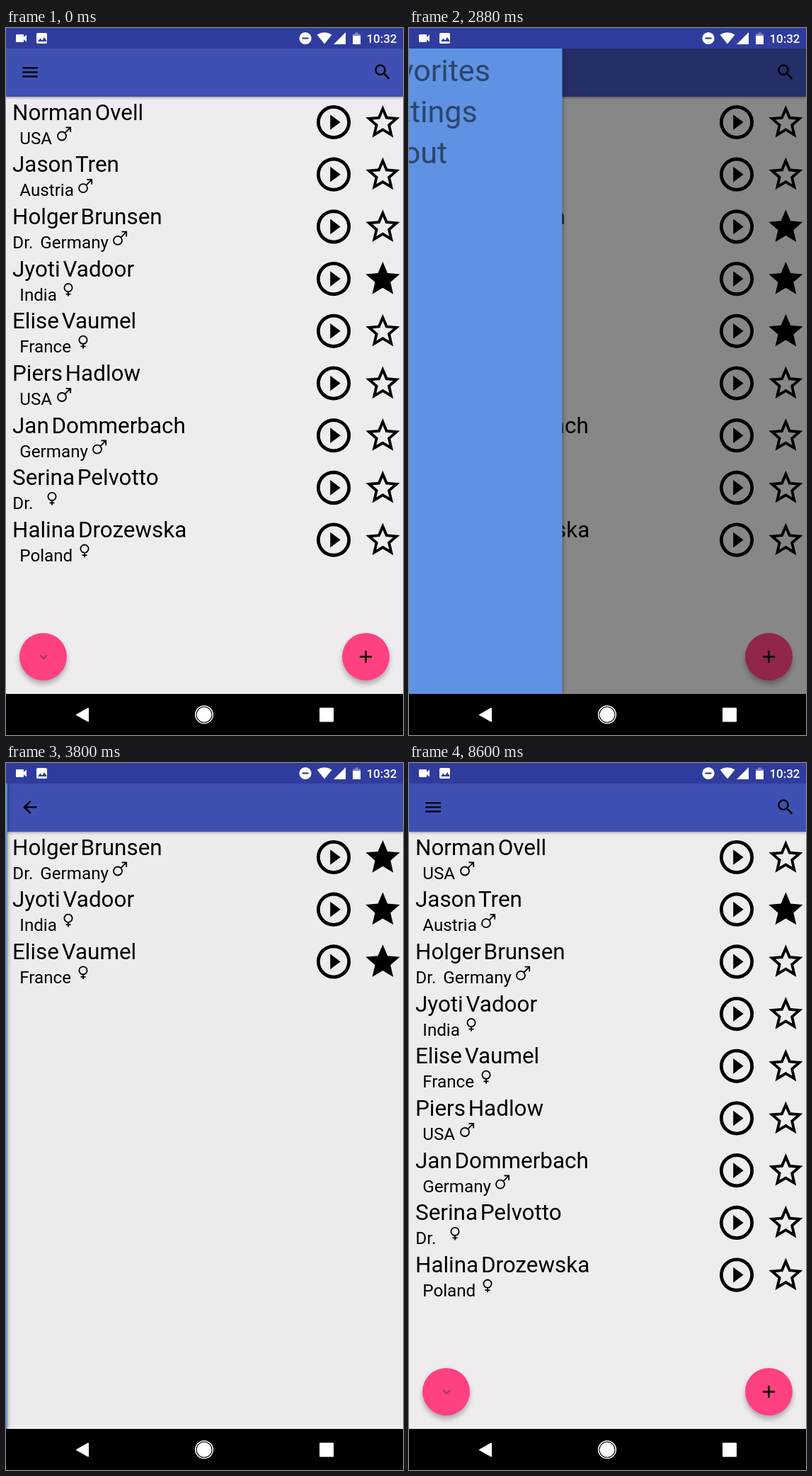
Write an HTML page that moves like this. It is 561 px wide and 998 px high and loops after 8.84 s.

```html
<!DOCTYPE html>
<html lang="en">
<head>
<meta charset="utf-8">
<title>Contacts</title>
<style>
  html, body { margin: 0; width: 100%; height: 100%; overflow: hidden; background: #000; }
  #stage { position: relative; width: 561px; height: 998px; overflow: hidden; color: #000;
    font-family: Roboto, sans-serif; }
  #stage div, #stage svg { position: absolute; }
  svg { display: block; overflow: visible; }
  #status { left: 0; top: 0; background: #303c9d; }
  #nav { left: 0; top: 940px; background: #000; }
  #app { left: 0; top: 29px; width: 561px; height: 911px; overflow: hidden; background: #eeecef; }
  #bar { left: 0; top: 0; width: 561px; height: 67.5px; background: #3f50b4;
    box-shadow: 0 1px 4px rgba(0, 0, 0, .4); }
  .row { left: 0; top: 0; width: 561px; height: 74px; white-space: nowrap; }
  .name { left: 9px; top: 4.5px; font-size: 31.4px; line-height: 36px; word-spacing: -4px; }
  .info { left: 9.3px; top: 45px; display: flex; font-size: 24.2px; line-height: 28px; }
  #stage .info svg { position: static; margin: -4px 0 0 4.5px; }
  .info span { margin-left: 10px; }
  .icon { left: 0; top: 0; }
  .fab { top: 825px; width: 67px; height: 67px; border-radius: 50%; background: #ff4081;
    box-shadow: 0 5px 7px rgba(0, 0, 0, .28); }
  #scrim { inset: 0; background: #000; }
  #drawer { left: 0; top: 0; width: 290px; height: 911px; background: #5f92e3;
    box-shadow: 0 0 6px rgba(0, 0, 0, .45); font-size: 43px; line-height: 58px; color: #2c456c; }
  #drawer div { left: 0; width: 277px; padding-left: 13px; height: 58px; }
  #press { top: 1px; background: rgba(0, 0, 0, .06); }
</style>
</head>
<body>
<div id="stage">
  <div id="app">
    <div id="home"></div>
    <div id="faves"></div>
    <div id="bar"></div>
    <div id="fabs">
      <div class="fab" style="left:19px"><svg width="67" height="67"><path d="M29 31.2l5 5 5-5" fill="none" stroke="#84405a" stroke-width="1.7"/></svg></div>
      <div class="fab" style="left:475px"></div>
    </div>
    <div id="scrim"></div>
    <div id="drawer">
      <div id="press"></div>
      <div style="top:2px">Favorites</div>
      <div style="top:60px">Settings</div>
      <div style="top:118px">About</div>
    </div>
  </div>
  <svg id="status" width="561" height="29" fill="#fff">
    <rect x="14" y="9" width="11" height="11" rx="1"/>
    <path d="M24 13.5l5-4v10l-5-4z"/>
    <rect x="43" y="7" width="15" height="15" rx="2"/>
    <path d="M45 19l3.5-4.5 2.5 3 3-4.5 4 6z" fill="#303c9d"/>
    <circle cx="423" cy="14.5" r="8.6"/>
    <path d="M418.5 13.4h9v2.2h-9z" fill="#303c9d"/>
    <path d="M450 22.5L439.5 9.6q10.5-6.5 21 0z"/>
    <path d="M480 6v17h-17z"/>
    <path d="M490 8.5h3.5v-2h4v2h3.5v3h-11z" opacity=".4"/>
    <path d="M490 11h11v12h-11z"/>
    <text x="509.5" y="21" font-size="16.9" font-weight="500">10:32</text>
  </svg>
  <svg id="nav" width="561" height="58" fill="#fff" stroke="#fff" stroke-linejoin="round">
    <path d="M100 29.5L116 20.5v18z" stroke-width="2"/>
    <circle cx="280" cy="29.3" r="10.5" stroke="none"/>
    <circle cx="280" cy="29.3" r="12.3" fill="none" stroke-width="1.5"/>
    <rect x="444" y="20.5" width="18" height="18" stroke-width="2"/>
  </svg>
</div>
<script>
const LOOP = 8840, PITCH = 73.7;
const $ = id => document.getElementById(id);

const PATHS = {
  menu: 'M3 18h18v-2H3zM3 13h18v-2H3zM3 6v2h18V6z',
  back: 'M20 11H7.83l5.59-5.59L12 4l-8 8 8 8 1.41-1.41L7.83 13H20z',
  search: 'M15.5 14h-.79l-.28-.27A6.47 6.47 0 0 0 16 9.5 6.5 6.5 0 1 0 9.5 16c1.61 0 3.09-.59 4.23-1.57l.27.28v.79l5 4.99L20.49 19zM9.5 14a4.5 4.5 0 1 1 0-9 4.5 4.5 0 0 1 0 9z',
  add: 'M19 13h-6v6h-2v-6H5v-2h6V5h2v6h6z',
  play: 'M10 16.5l6-4.5-6-4.5zM12 2a10 10 0 1 0 0 20 10 10 0 0 0 0-20zm0 18a8 8 0 1 1 0-16 8 8 0 0 1 0 16z',
  star: 'M12 17.27L18.18 21l-1.64-7.03L22 9.24l-7.19-.61L12 2 9.19 8.63 2 9.24l5.46 4.73L5.82 21z',
  hollow: 'M22 9.24l-7.19-.62L12 2 9.19 8.63 2 9.24l5.46 4.73L5.82 21 12 17.27 18.18 21l-1.63-7.03zM12 15.4l-3.76 2.27 1-4.28-3.32-2.88 4.38-.38L12 6.1l1.71 4.04 4.38.38-3.32 2.88 1 4.28z'
};
const SIGNS = {
  m: 'M15 15a6 6 0 1 1-12 0a6 6 0 1 1 12 0M13.3 10.7L21 3M14.5 2.8h6.7v6.7',
  f: 'M17.6 8a5.6 5.6 0 1 1-11.2 0a5.6 5.6 0 1 1 11.2 0M12 13.6v6.6M8.5 17h7'
};

// icon centred on (x, y); a transform keeps fractions of a pixel
const icon = (name, x, y, size) =>
  `<svg class="icon ${name}" style="transform:translate(${x - size / 2}px,${y - size / 2}px)" width="${size}" height="${size}" viewBox="0 0 24 24"><path fill-rule="evenodd" d="${PATHS[name]}"/></svg>`;

const people = [
  ['Norman Ovell', '', 'USA', 'm'],
  ['Jason Tren', '', 'Austria', 'm'],
  ['Holger Brunsen', 'Dr.', 'Germany', 'm'],
  ['Jyoti Vadoor', '', 'India', 'f'],
  ['Elise Vaumel', '', 'France', 'f'],
  ['Piers Hadlow', '', 'USA', 'm'],
  ['Jan Dommerbach', '', 'Germany', 'm'],
  ['Serina Pelvotto', 'Dr.', '', 'f'],
  ['Halina Drozewska', '', 'Poland', 'f']
];

// person index -> [starred from, starred until]
const starred = { 1: [8160, LOOP], 2: [1440, 6600], 3: [0, 5680], 4: [1960, 5200] };
const OPEN = 2758, CLOSE = 3474, SETTLE = 512, TO_FAVES = 3480, TO_HOME = 7440;

function row([name, title, land, sex], i) {
  return `<div class="row" style="transform:translateY(${67.5 + i * PITCH}px)">
    <div class="name">${name}</div>
    <div class="info">${title}<span>${land}</span><svg width="24" height="24" fill="none" stroke="#000" stroke-width="1.8"><path d="${SIGNS[sex]}"/></svg></div>
    ${icon('play', 463, 36.5, 57.8)}${icon('hollow', 532.4, 36.5, 57.8)}${icon('star', 532.4, 36.5, 57.8)}
  </div>`;
}

$('home').innerHTML = people.map(row).join('');
$('faves').innerHTML = people.slice(2, 5).map(row).join('');
$('bar').innerHTML = icon('menu', 34, 33.4, 29) + icon('back', 34, 33.4, 29) + icon('search', 532, 33.2, 29);
$('fabs').lastElementChild.innerHTML = icon('add', 33.4, 33.5, 29);

const show = (el, on) => { el.style.visibility = on ? 'visible' : 'hidden'; };
const find = (root, cls) => root.querySelector('.' + cls);
const within = (t, [a, b]) => t >= a && t < b;
const isStarred = (i, t) => i in starred && within(t, starred[i]);
const settle = (t, start) => 1 - (1 - Math.min(1, Math.max(0, (t - start) / SETTLE))) ** 5;

const homeRows = [...$('home').children], faveRows = [...$('faves').children];
const [menu, back, search] = ['menu', 'back', 'search'].map(c => find($('bar'), c));

// the favourites that remain close up to the top
function layFaves(t) {
  let place = 0;
  faveRows.forEach((r, i) => {
    const on = isStarred(i + 2, t);
    r.style.display = on ? '' : 'none';
    if (on) r.style.transform = `translateY(${67.5 + PITCH * place++}px)`;
    show(find(r, 'hollow'), false);
  });
}

function render(t) {
  const faves = within(t, [TO_FAVES, TO_HOME]);
  homeRows.forEach((r, i) => {
    const on = isStarred(i, t);
    show(find(r, 'star'), !faves && on);
    show(find(r, 'hollow'), !faves && !on);
  });
  layFaves(t);
  show($('home'), !faves);
  $('faves').style.display = faves ? '' : 'none';
  $('fabs').style.display = faves ? 'none' : '';
  show(menu, !faves);
  show(search, !faves);
  show(back, faves);

  const offset = settle(t, OPEN) - settle(t, CLOSE);
  $('drawer').style.transform = `translateX(${290 * (offset - 1)}px)`;
  show($('drawer'), offset > 0.001);
  $('scrim').style.opacity = 0.58 * offset;
  $('press').style.display = within(t, [3340, 3620]) ? '' : 'none';
}

const begin = performance.now();
function tick() {
  render((performance.now() - begin) % LOOP);
  requestAnimationFrame(tick);
}
tick();
</script>
</body>
</html>
```
